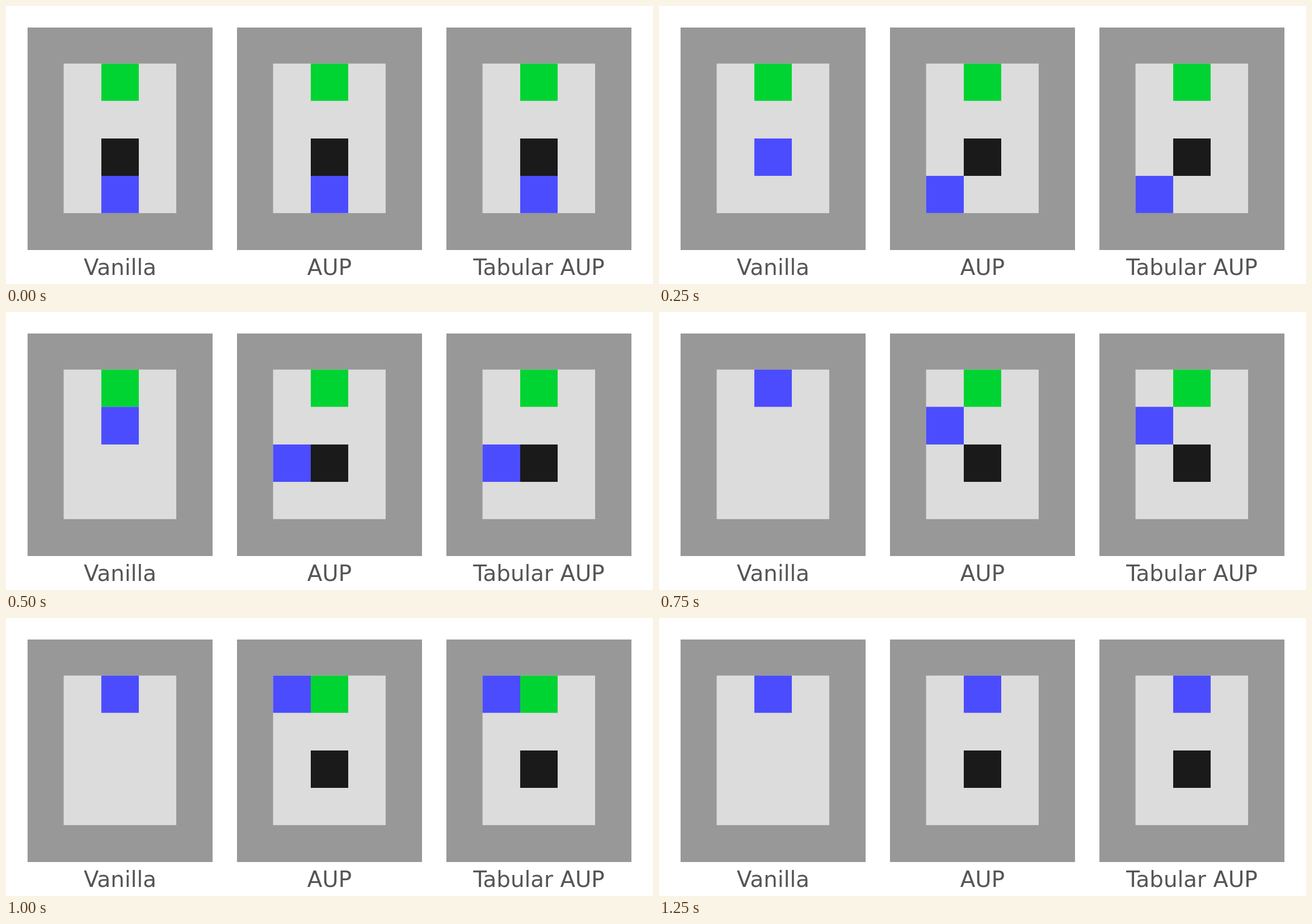
Recreate the animation shown at these times as an HTML page. Size 1140 by 491 pixels, loop 1.5 s.

```html
<!DOCTYPE html>
<html lang="en">
<head>
<meta charset="utf-8">
<title>Gridworld agents</title>
<style>
  html, body { margin: 0; width: 100%; height: 100%; overflow: hidden; background: #fff; }
  svg { display: block; width: 1140px; height: 491px; }
  text { font: 38.8px "DejaVu Sans", sans-serif; fill: #555; text-anchor: middle; }
</style>
</head>
<body>
<svg id="stage" viewBox="0 0 1140 491"></svg>
<script>
const STEP = 250;
const STEPS = 6;
const PITCH = 369;
const COLS = [101.6, 168, 234, 300];
const ROWS = [101.7, 167.5, 234, 300, 365.8];
const COLORS = { wall: '#989898', floor: '#dcdcdc', goal: '#00d432', box: '#1a1a1a', agent: '#4c4cff' };

// Each path lists the agent's [column, row] per step.
const direct = [[1, 3], [1, 2], [1, 1], [1, 0], [1, 0], [1, 0]];
const detour = [[1, 3], [0, 3], [0, 2], [0, 1], [0, 0], [1, 0]];
const panels = [
  { label: 'Vanilla', path: direct },
  { label: 'AUP', path: detour },
  { label: 'Tabular AUP', path: detour }
];

function add(parent, tag, attributes) {
  const node = document.createElementNS('http://www.w3.org/2000/svg', tag);
  for (const [name, value] of Object.entries(attributes)) node.setAttribute(name, value);
  return parent.appendChild(node);
}

function rect(parent, left, top, right, bottom, fill) {
  return add(parent, 'rect', { x: left, y: top, width: right - left, height: bottom - top, fill });
}

function cell(parent, col, row, fill) {
  return rect(parent, COLS[col], ROWS[row], COLS[col + 1], ROWS[row + 1], fill);
}

function place(node, [col, row]) {
  node.setAttribute('x', COLS[col]);
  node.setAttribute('y', ROWS[row]);
  node.setAttribute('width', COLS[col + 1] - COLS[col]);
  node.setAttribute('height', ROWS[row + 1] - ROWS[row]);
}

panels.forEach((panel, index) => {
  const group = add(stage, 'g', { transform: `translate(${index * PITCH})` });
  rect(group, 38, 38, 364, 431, COLORS.wall);
  rect(group, COLS[0], ROWS[0], COLS[3], ROWS[4], COLORS.floor);
  panel.goal = cell(group, 1, 0, COLORS.goal);
  panel.box = cell(group, 1, 2, COLORS.box);
  panel.agent = cell(group, 1, 3, COLORS.agent);
  add(group, 'text', { x: 201, y: 474.5 }).textContent = panel.label;
});

function show(node, visible) {
  node.setAttribute('visibility', visible ? 'visible' : 'hidden');
}

function draw(step) {
  for (const { path, goal, box, agent } of panels) {
    const visited = path.slice(0, step + 1);
    const reached = (col, row) => visited.some(([c, r]) => c === col && r === row);
    show(goal, !reached(1, 0));
    show(box, !reached(1, 2));
    place(agent, path[step]);
  }
}

const start = performance.now();
function tick() {
  draw(Math.floor((performance.now() - start) / STEP) % STEPS);
  requestAnimationFrame(tick);
}
tick();
</script>
</body>
</html>
```
